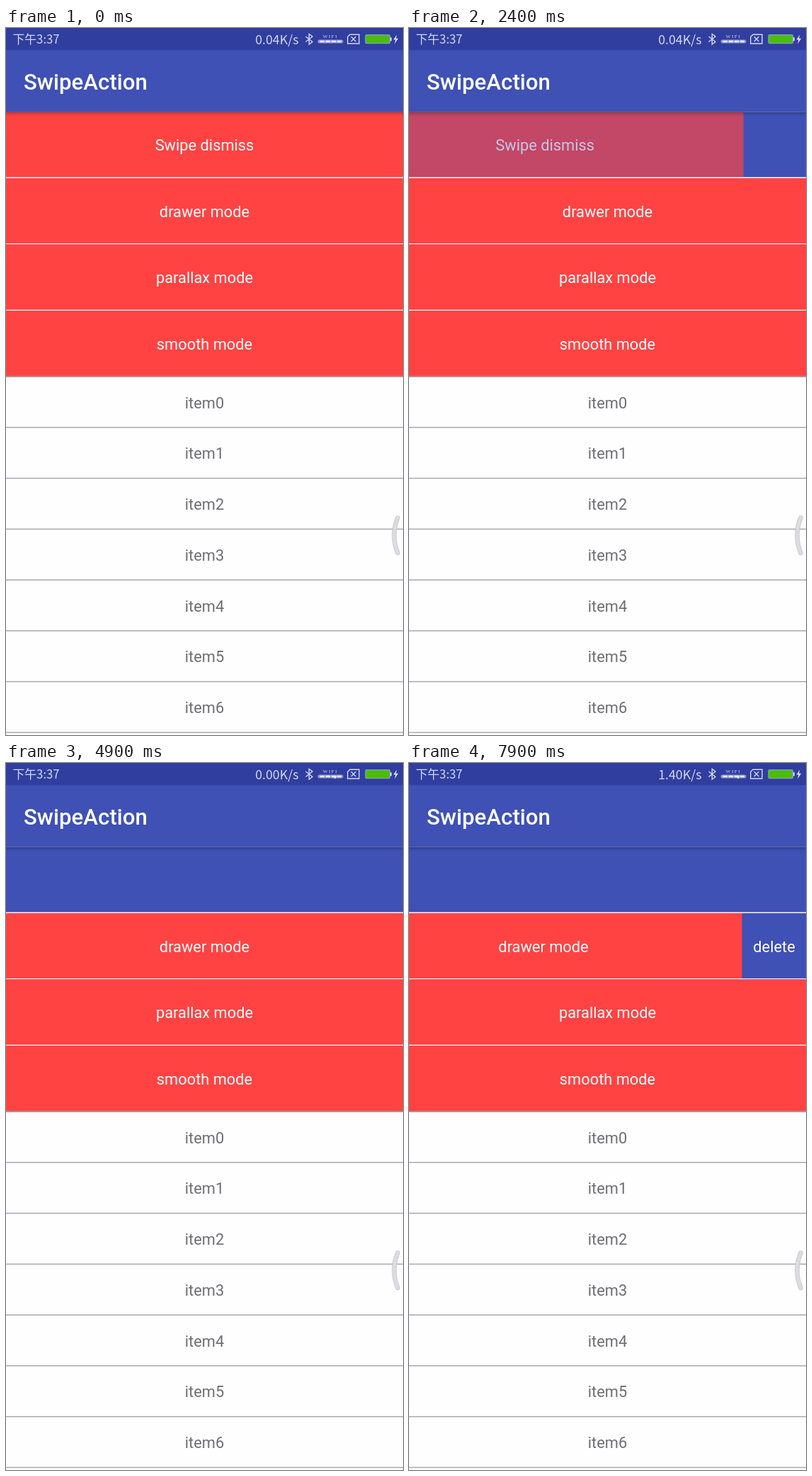
Recreate the animation shown at these times as an HTML page. Size 561 by 998 pixels, loop 8000 ms.

```html
<!DOCTYPE html>
<html lang="en">
<head>
<meta charset="utf-8">
<title>Swipe list</title>
<style>
  html, body { margin: 0; width: 100%; height: 100%; overflow: hidden; background: #fefdff; }
  svg { display: block; width: 561px; height: 998px; }
  text { font-family: Roboto, sans-serif; }
  .label { font-size: 21.82px; text-anchor: middle; fill: #fff; }
  .item { fill: #6e6e70; }
  .title { font-size: 31.2px; font-weight: 500; fill: #fff; }
  .status { font-family: "Noto Sans CJK SC", "Noto Sans CJK", "Noto Sans", sans-serif; font-weight: 300; fill: #d3d7ef; }
  .icon { fill: none; stroke: #d3d7ef; stroke-width: 1.4; }
</style>
</head>
<body>
<svg viewBox="0 0 561 998">
  <defs>
    <linearGradient id="shade" x2="0" y2="1">
      <stop offset="0" stop-opacity=".3"/>
      <stop offset=".4" stop-opacity=".1"/>
      <stop offset="1" stop-opacity="0"/>
    </linearGradient>
  </defs>
  <rect width="561" height="998" fill="#fefdff"/>
  <g id="list"></g>

  <rect y="118.4" width="561" height="7" fill="url(#shade)"/>
  <rect y="30" width="561" height="88.4" fill="#3f51b5"/>
  <rect width="561" height="31.2" fill="#303f9f"/>
  <text class="title" x="25" y="87">SwipeAction</text>

  <text class="status" x="9.5" y="22.3" font-size="16.8">下午3:37</text>
  <text class="status" id="speed" x="413.5" y="22.5" font-size="17.8" text-anchor="end">0.04K/s</text>
  <path class="icon" d="M423.5 12 433 19.5 428.3 23V8.5L433 12 423.5 19.5"/>
  <text x="458.5" y="14.2" font-size="7" text-anchor="middle" letter-spacing="1.6" fill="#d3d7ef" style="font-family:'Liberation Serif',serif">WIFI</text>
  <path d="M443 19H474" stroke="#8f98d0" stroke-width="5" stroke-linecap="round"/>
  <path d="M443.5 19H474" stroke="#e6e8f8" stroke-width="2.6" stroke-dasharray="6.4 1.8"/>
  <path id="active" d="M462 18.5h6l-3 4z" fill="#e6e8f8" visibility="hidden"/>
  <path class="icon" d="M486 9.2H499V22H482.7V12.5ZM487.7 12.3 494.3 18.9M494.3 12.3 487.7 18.9"/>
  <rect x="508" y="9.7" width="34.5" height="12" rx="1" fill="#4bbd0b" stroke="#9ca5d6" stroke-width="1"/>
  <rect x="543" y="13.3" width="2" height="5" fill="#c8cdeb"/>
  <path d="M552.3 9.5 547.5 16.5H550.5L549 22.5 554.2 14.8H551Z" fill="#e0e3f4"/>

  <g fill="none" stroke-linecap="round">
    <path d="M553.5 691.5Q543.5 716 553.5 741" stroke="#c6c5c9" stroke-width="6.4"/>
    <path d="M553.5 691.5Q543.5 716 553.5 741" stroke="#dddce0" stroke-width="4.6"/>
  </g>
</svg>
<script>
const W = 561, TOP = 118.4, ROW = 93.6, CELL = 71.77, LINE = 1.5;
const LOOP = 8000, STEP = 100;
const RED = "#ff4343", BLUE = "#3f51b5", GRAY = "#a9a8ab";
const list = document.getElementById("list");
const speed = document.getElementById("speed");
const active = document.getElementById("active");

function add(parent, tag, attrs, text = "") {
  const node = document.createElementNS("http://www.w3.org/2000/svg", tag);
  for (const key in attrs) node.setAttribute(key, attrs[key]);
  node.textContent = text;
  return parent.appendChild(node);
}

function addLine(bottom, fill) {
  add(list, "rect", { y: bottom - LINE, width: W, height: LINE, fill });
}

const rows = ["Swipe dismiss", "drawer mode", "parallax mode", "smooth mode"].map((name, i) => {
  const y = TOP + i * ROW, base = y + 54.6;
  add(list, "rect", { y, width: W, height: ROW, fill: BLUE });
  if (i === 1) add(list, "text", { class: "label", x: 516, y: base }, "delete");
  const row = add(list, "g", {});
  add(row, "rect", { y, width: W, height: ROW, fill: RED });
  add(row, "text", { class: "label", x: W / 2, y: base }, name);
  addLine(y + ROW, i < 3 ? "#fff5f7" : GRAY);
  return row;
});

for (let i = 0; i < 7; i++) {
  const y = TOP + 4 * ROW + i * CELL;
  add(list, "text", { class: "label item", x: W / 2, y: y + 43.8 }, "item" + i);
  addLine(y + CELL, GRAY);
}

// [time, offset] pairs
const dismissPath = [[1700, 0], [1800, -16], [2000, -52], [2300, -84], [2600, -97], [3100, -105.5],
  [3500, -98], [3600, -87], [3700, -72], [3800, -55], [3900, -W]];
const drawerPath = [[6000, 0], [6100, -6], [6400, -43], [6700, -76], [6800, -78], [7000, -42],
  [7200, 0], [7300, -12], [7500, -62], [7600, -82], [7700, -90.5]];

function at(path, t) {
  if (t <= path[0][0]) return path[0][1];
  for (let i = 1; i < path.length; i++) {
    const [t0, a] = path[i - 1], [t1, b] = path[i];
    if (t <= t1) return a + (b - a) * (t - t0) / (t1 - t0);
  }
  return path[path.length - 1][1];
}

function move(row, x) {
  row.setAttribute("transform", `translate(${x} 0)`);
}

function draw(t) {
  const x = at(dismissPath, t);
  move(rows[0], x);
  rows[0].setAttribute("opacity", Math.max(0, 1 + 2 * x / W));
  move(rows[1], at(drawerPath, t));
  speed.textContent = (t < 3700 ? "0.04" : t < 7700 ? "0.00" : "1.40") + "K/s";
  active.setAttribute("visibility", t < 3700 ? "hidden" : "visible");
}

const start = performance.now();
function tick() {
  const t = (performance.now() - start) % LOOP;
  draw(Math.floor(t / STEP) * STEP);
  requestAnimationFrame(tick);
}
tick();
</script>
</body>
</html>
```
